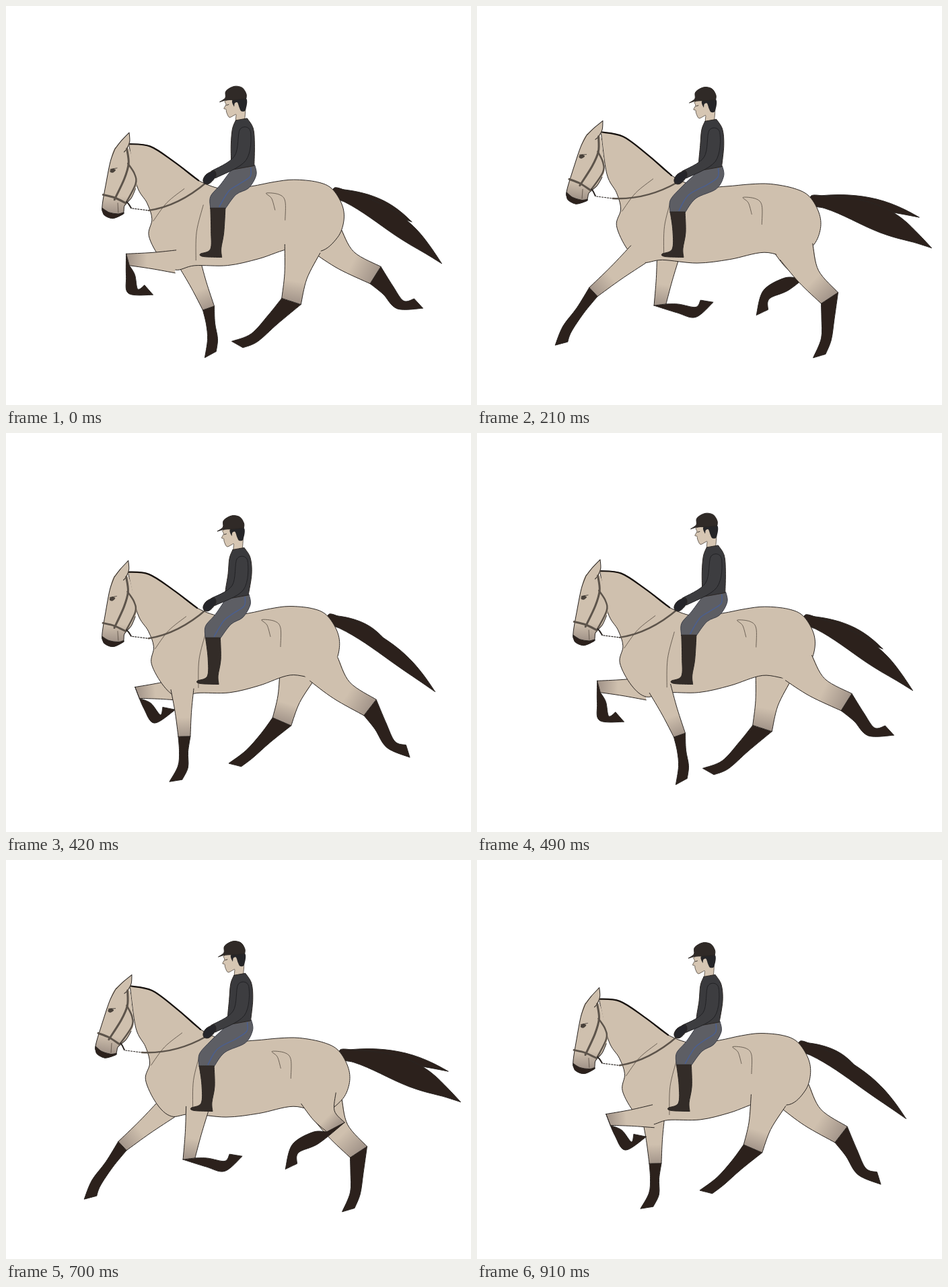
Write an HTML page with a canvas that moves like this. It is 691 px wide and 593 px high and loops after 0.98 s.

```html
<!DOCTYPE html>
<html>
<head>
<meta charset="utf-8">
<style>
html, body { margin: 0; height: 100%; overflow: hidden; background: #fff; }
canvas { display: block; }
</style>
</head>
<body>
<canvas id="stage" width="691" height="593"></canvas>
<script>
const ctx = document.getElementById('stage').getContext('2d');
const STEP = 70, STRIDE = 14, HALF = 7;
const COAT = '#cfc0ae', SHADE = '#a3958a', DARK = '#2c211c', LINE = '#2a2522', TACK = '#5d544b', SOFT = '#54493f';

const pairs = flat => flat.flatMap((v, i) => i % 2 ? [] : [[v, flat[i + 1]]]);
const from = ([x, y], ...flat) => pairs(flat).map(p => [x + p[0], y + p[1]]);
const polar = ([x, y], angle, len) => [x + len * Math.cos(angle), y + len * Math.sin(angle)];
const mix = (a, b, k = .5) => [a[0] + (b[0] - a[0]) * k, a[1] + (b[1] - a[1]) * k];
const wave = (t, lag, period = HALF) => Math.cos(2 * Math.PI * (t - lag) / period);

// The trunk at rest: crest, back, croup, belly, chest, throat
const TRUNK = pairs([183,197, 215,202, 250,226, 287,256, 327,271, 366,268, 400,263, 430,261, 465,266, 487,277, 502,302, 504,326,
  494,350, 468,369, 425,363, 376,376, 329,384, 279,382, 250,387, 228,369, 211,335, 216,310, 209,286, 194,259]);

// Knee and fetlock at moments of the stride
const FORE = {
  bend: t => .35 + 1.05 * wave(t, 12.7, STRIDE), hoof: 30, widths: [17, 12, 9, 6.5, 7.5],
  keys: [[0, 181,377, 189,424], [1, 162,375, 151,432], [3, 173,425, 134,480], [6, 265,451, 263,496],
    [7, 301,449, 307,495], [8, 328,439, 374,483], [10, 272,444, 325,455], [13, 195,386, 225,425]]
};
const HIND = {
  bend: t => .05 + .8 * wave(t, 8.3, STRIDE), hoof: 34, widths: [30, 27, 17, 15, 9.5, 7.5],
  keys: [[0, 424,439, 369,493], [1, 451,456, 431,502], [3, 524,434, 519,495], [6, 541,408, 572,463],
    [7, 549,400, 586,444], [8, 527,369, 518,431], [10, 490,397, 430,429], [13, 410,429, 362,477]]
};

// Periodic cubic interpolation of [time, ...values] rows, returned as points
function pose(keys, time) {
  const n = keys.length, t = time % STRIDE;
  const at = i => {
    const lap = Math.floor(i / n), [when, ...values] = keys[i - lap * n];
    return [when + lap * STRIDE, values];
  };
  let i = n - 1;
  while (keys[i][0] > t) i--;
  const [[ta, a], [tb, b], [tc, c], [td, d]] = [i - 1, i, i + 1, i + 2].map(at);
  const span = tc - tb, u = (t - tb) / span, v = 1 - u;
  return pairs(b.map((p, k) => {
    const m0 = (c[k] - a[k]) / (tc - ta) * span, m1 = (d[k] - p) / (td - tb) * span;
    return p * (1 + 2 * u) * v * v + c[k] * (3 - 2 * u) * u * u + m0 * u * v * v - m1 * u * u * v;
  }));
}

// The trunk pitches and stretches once per half stride
const pitch = t => wave(t, 2.8), reach = t => wave(t, 2);
const flex = t => ([x, y]) => [
  x + reach(t) * (.05 * (x - 320) + .066 * (330 - y)),
  y - 9 * pitch(t) * (1 - (x - 200) / 165)
];

// Smooth path; a repeated point makes a corner
function spline(pts, closed) {
  const n = pts.length;
  const get = i => closed ? pts[(i + n) % n] : pts[Math.max(0, Math.min(n - 1, i))];
  ctx.beginPath();
  ctx.moveTo(...pts[0]);
  for (let i = 0; i < (closed ? n : n - 1); i++) {
    const [a, b, c, d] = [get(i - 1), get(i), get(i + 1), get(i + 2)];
    if (b[0] === c[0] && b[1] === c[1]) continue;
    ctx.bezierCurveTo(b[0] + (c[0] - a[0]) / 6, b[1] + (c[1] - a[1]) / 6,
      c[0] - (d[0] - b[0]) / 6, c[1] - (d[1] - b[1]) / 6, c[0], c[1]);
  }
}
function shape(pts, fill, line = LINE, width = 1) {
  spline(pts, true);
  ctx.fillStyle = fill;
  ctx.fill();
  if (line) ink(line, width);
}
function stroke(pts, line = LINE, width = 1) {
  spline(pts);
  ink(line, width);
}
function ink(line, width) {
  ctx.strokeStyle = line;
  ctx.lineWidth = width;
  ctx.stroke();
}
function fadeTo(a, b) {
  const fade = ctx.createLinearGradient(...a, ...b);
  fade.addColorStop(0, COAT);
  fade.addColorStop(1, SHADE);
  return fade;
}

function unit(p, q) {
  const x = q[0] - p[0], y = q[1] - p[1], len = Math.hypot(x, y) || 1;
  return [x / len, y / len];
}
// Points beside a chain of joints; a joint mostly follows the bone above it
function side(joints, widths, sign) {
  return widths.map((w, i) => {
    const c = joints[i], u = unit(joints[Math.max(0, i - 1)], c), v = unit(c, joints[Math.min(joints.length - 1, i + 1)]);
    const [dx, dy] = unit([0, 0], [u[0] + .3 * v[0], u[1] + .3 * v[1]]);
    return [c[0] - dy * w * sign, c[1] + dx * w * sign];
  });
}

function leg(upper, [knee, fetlock], t, { bend, hoof, widths }) {
  const angle = Math.atan2(fetlock[1] - knee[1], fetlock[0] - knee[0]) - bend(t);
  const toe = polar(fetlock, angle, hoof);
  const heel = polar(polar(toe, angle, -15), angle - Math.PI / 2, 12);
  const chain = [...upper, knee, mix(knee, fetlock), fetlock, mix(toe, heel)];
  const front = side(chain, widths, 1), back = side(chain, widths, -1), k = upper.length;
  const skip = k - 2;

  shape([front[0], ...front.slice(0, k + 1), front[k], back[k], ...back.slice(0, k + 1).reverse(), back[0]],
    fadeTo(mix(knee, upper[k - 1], .8), knee), null);
  stroke(front.slice(skip, k + 1));
  stroke(back.slice(skip, k + 1));
  shape([front[k], ...front.slice(k), toe, toe, heel, heel, ...back.slice(k).reverse(), back[k]], DARK);
}
function foreleg(t) {
  const joints = pose(FORE.keys, t);
  const elbow = [262 - 23 * wave(t, 2.5, STRIDE), 375 - 6 * pitch(t)];
  leg([elbow, mix(elbow, joints[0])], joints, t, FORE);
}
function hindleg(t) {
  const joints = pose(HIND.keys, t), hip = flex(t)([452, 324]);
  const gaskin = from(mix(hip, joints[0], .6), -4, 10)[0];
  leg([hip, mix(hip, gaskin), gaskin], joints, t, HIND);
}

// A strand of hair that leaves the dock flatter than it ends
function plume(dock, angle, len, root, belly) {
  const bow = polar(dock, angle - .28, len * .44), tip = polar(dock, angle, len), spine = [], widths = [];
  for (let u = 0; u <= 1; u += .125) {
    spine.push(mix(mix(dock, bow, u), mix(bow, tip, u), u));
    widths.push((root + belly * Math.sin(Math.PI * u ** 1.4)) * (1 - u ** 6));
  }
  const upper = side(spine, widths, -1), lower = side(spine, widths, 1);
  shape([...upper, ...lower.reverse()], DARK);
}
function tail(t) {
  const dock = flex(t)([489, 282]), angle = .49 - .115 * pitch(t), full = reach(t);
  plume(dock, angle - .22, 135 + 45 * full, 5, 3);
  plume(dock, angle, 193, 7, 9 + 5 * full);
}

function trunk(p) {
  shape([p[0], ...p], COAT);
  stroke(p.slice(0, 4), '#17120f', 2.2);
}
function markings(p) {
  stroke(from(p[21], 2, 3, 22, -24, 48, -45), SOFT, .8);
  stroke(from(p[17], 13, -90, 3, -50, 2, -8), SOFT, .8);
  stroke(from(p[7], -28, 45, -33, 28, -41, 20, -22, 22, -13, 32, -13, 60), SOFT, .8);
}

function horseHead(poll, tilt) {
  ctx.save();
  ctx.translate(...poll);
  ctx.rotate(tilt);
  const face = pairs([-18,2, -25,22, -31,55, -36,88, -34,99, -20,106, -5,99, -3,88, 7,76, 13,62, 15,50]);
  const ear = pairs([-18,3, -10,-8, 2,-21, 2,-21, 3,-8, -1,3]);
  shape([...face, [9, 25], [1, 2]], fadeTo([0, 74], [0, 98]), null);
  stroke(face.slice(0, 10));
  shape(ear, COAT, null);
  stroke([...ear, [-5, 8]]);
  shape(pairs([-36,92, -36,92, -26,98, -12,100, -4,98, -6,101, -20,107, -33,102]), DARK);
  stroke(pairs([-13,84, -12,98]), SOFT, .8);
  shape(pairs([-25,35, -21,33, -17,35, -21,39, -25,38]), '#4a423b', null);
  stroke(pairs([-25,34, -20,33, -15,32]), LINE, .8);
  stroke(pairs([-1,3, 2,25, -4,48, -18,79]), TACK, 3);
  stroke(pairs([-35,72, -18,76, -1,84]), TACK, 3);
  stroke(pairs([1,25, 11,40, 13,55, 0,82]), TACK, 2.4);
  stroke(pairs([0,82, 3,85, 7,91]), LINE, 2);
  ctx.restore();
}

function reins(poll, tilt, hand) {
  const bit = polar(poll, tilt + 1.473, 92), slack = from(bit, 24, 3)[0];
  const sag = from(mix(slack, hand), 0, 18)[0];
  ctx.setLineDash([2, 2]);
  stroke([bit, slack], LINE, 1.2);
  ctx.setLineDash([]);
  ctx.beginPath();
  ctx.moveTo(...slack);
  ctx.quadraticCurveTo(...sag, hand[0] - 3, hand[1] + 7);
  ink(TACK, 2.4);
}

function rider(t) {
  const sway = wave(t, 1.2), rise = 4 * wave(t, 1.3);
  const head = [339 + 4 * sway, 134 - rise], neck = [348 + 5 * sway, 171.5 - rise], hip = [350 + 10 * sway, 253 - rise];
  const hand = [301, 255], elbow = [346 + 4 * sway, 228 - rise];
  const knee = [305 + 11 * wave(t, .5), 304 - 5 * wave(t, .8)], ankle = [304 + 8 * wave(t, .3), 368.5];
  const cloth = '#3a3a3d', boot = '#332c28', skin = '#d6c6b3';

  // Breeches and boot
  shape([...from(knee, -11,1, -11,1, -11,-17, 4,-35), ...from(hip, -19,-9, -19,-9, 15,-15, 15,-15, 17,0, 6,19),
    ...from(knee, 27,-20, 11,1, 11,1)], '#5d5e64', '#3b3e48');
  stroke([...from(hip, 9,-11, 8,2, -8,13), ...from(knee, 16,-25, 2,-2)], '#4b5f8f', 1.6);
  shape([...from(knee, -11,0, -11,0, 11,0, 11,0), ...from(ankle, 12,-32, 8,-8, 9,5, 9,5, -18,4, -23,0, -8,-7),
    ...from(ankle, -7,-34)], boot);

  // Neck, face, hair, helmet
  shape(from(head, -14,8, -14,14, -17,20, -14,21, -13,26, -9,33, -2,30, 1,29, 1,38, 9,40, 14,34, 12,8), skin, '#4a4038', .8);
  stroke(from(head, -13,15, -10,14), LINE, .9);
  shape(from(head, -4,7, -2,17, -1,12, 3,11, 6,19, 9,24, 15,22, 16,5), '#252528', null);
  shape(from(head, -23,10, -23,10, -15,4, -14,-6, -2,-13, 10,-11, 16,-2, 16,5, 16,5, 0,7, -12,7), '#302a27');

  // Jacket, sleeve, glove
  shape([...from(neck, -9,0, -9,0, -14,13, -16,36), ...from(hip, -20,-20, -19,-8, -19,-8, 14,-14, 14,-14),
    ...from(neck, 19,36, 17,12, 8,-3, 8,-3)], cloth);
  const arm = [from(neck, 5,15)[0], elbow, mix(elbow, hand, .85)], widths = [8, 9, 6];
  const outer = side(arm, widths, 1), inner = side(arm, widths, -1);
  shape([...outer, outer[2], inner[2], ...inner.reverse()], '#3d3d40', '#222225');
  shape(from(hand, 8,-10, -3,-5, -8,3, -6,9, 1,9, 9,1, 11,-5), '#25252a');
  return hand;
}

function draw(t) {
  ctx.clearRect(0, 0, 691, 593);
  const move = flex(t), body = TRUNK.map(move);
  const poll = move([181, 201]), tilt = .075 + .07 * pitch(t);
  hindleg(t + HALF);
  foreleg(t + HALF);
  tail(t);
  trunk(body);
  hindleg(t);
  foreleg(t);
  markings(body);
  horseHead(poll, tilt);
  reins(poll, tilt, [301, 255]);
  rider(t);
}

ctx.lineJoin = ctx.lineCap = 'round';
function tick() {
  draw(Math.floor(performance.now() / STEP) % STRIDE);
  requestAnimationFrame(tick);
}
tick();
</script>
</body>
</html>
```
